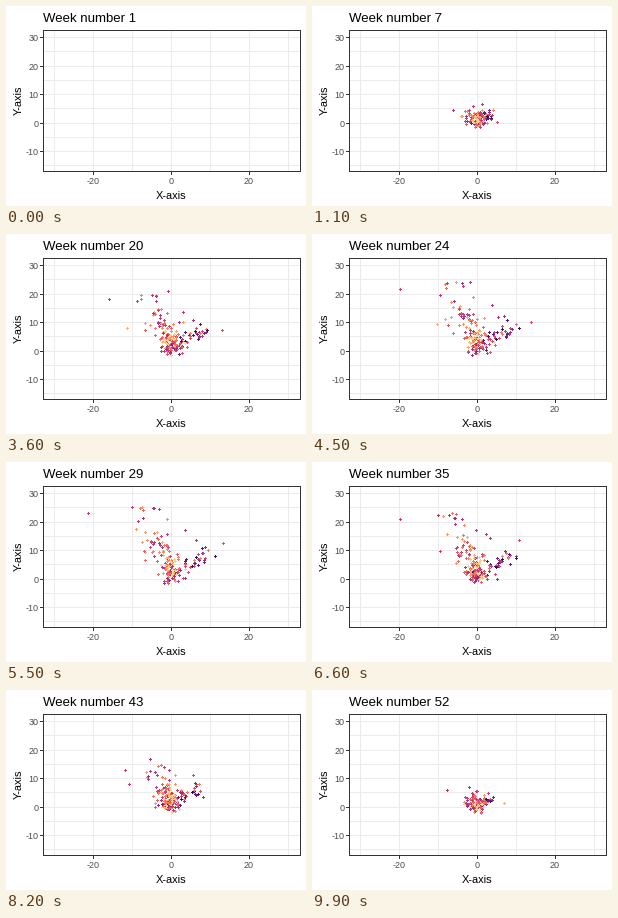
Write a matplotlib script that moves like this. It is 300 px wide and 200 px high and loops after 10000 ms.

```python
import numpy as np
import matplotlib.pyplot as plt
from matplotlib.animation import FuncAnimation

W, H, FRAMES, STEP, WEEKS = 300, 200, 100, 100, 52
PX = 0.72  # points per pixel at 100 dpi
LEFT, RIGHT, TOP, BOTTOM = 37, 294, 24, 165

plt.rcParams["font.family"] = "Liberation Sans"
fig = plt.figure(figsize=(W / 100, H / 100), dpi=100, facecolor="white")
ax = fig.add_axes([0, 0, 1, 1])
ax.set_xlim(0, W)
ax.set_ylim(H, 0)
ax.axis("off")


def sx(x):
    return 165 + 3.9 * x


def sy(y):
    return 117 - 2.845 * y


def line(x, y, color, z=1):
    # Whole coordinates snap to the centre of their pixel.
    ax.plot(x, y, color=color, lw=PX, antialiased=False, zorder=z,
            solid_capstyle="butt")


def label(x, y, s, size, color="black", **kw):
    return ax.text(x, y, s, fontsize=size * PX, color=color, **kw)


# Panel, grid and axes
GRID, DARK, GREY = "#ebebeb", "#333333", "#4d4d4d"
for v in range(-30, 31, 10):
    x = np.floor(sx(v))
    line([x, x], [TOP, BOTTOM], GRID)
    if abs(v) in (0, 20):
        line([x, x], [BOTTOM, BOTTOM + 3], DARK)
        label(x, 178.5, str(v), 9, GREY, ha="center")
for v in range(-15, 31, 5):
    y = np.floor(sy(v))
    line([LEFT, RIGHT], [y, y], GRID)
    if v % 10 == 0:
        line([LEFT - 3, LEFT], [y, y], DARK)
        label(32.5, y + 3.7, str(v), 9, GREY, ha="right")
line([LEFT, RIGHT, RIGHT, LEFT, LEFT], [TOP, TOP, BOTTOM, BOTTOM, TOP], DARK, 5)
label(165, 193, "X-axis", 11, ha="center")
label(12.5, 94.5, "Y-axis", 11, rotation=90, ha="center", va="center")
title = label(37, 16, "", 13.2)

# Swarm: a steep left arm, a flat right arm and a core around the origin
rng = np.random.default_rng(12)
N_LEFT, N_RIGHT, N_CORE = 75, 38, 75
N = N_LEFT + N_RIGHT + N_CORE

u_left = rng.beta(1.2, 1.7, N_LEFT)
u_right = rng.uniform(0, 1, N_RIGHT)
u_core = rng.uniform(0, 1, N_CORE)

sway_a, sway_b = rng.standard_t(4, (2, N, 2)) * 0.8
speed = rng.uniform(3, 9, (N, 1))
looseness = np.ones((N, 1))
looseness[:N_LEFT, 0] += 0.8 * u_left

tone = np.concatenate([
    rng.uniform(0.45, 0.88, N_LEFT),
    rng.uniform(0.15, 0.75, N_RIGHT),
    0.5 + 0.4 * u_core + rng.normal(0, 0.15, N_CORE),
])
tone = np.clip(tone, 0.03, 0.9)
tone[-1] = 0.99

dots = ax.scatter(np.zeros(N), np.zeros(N), s=(3 * PX) ** 2, marker="+",
                  c=plt.get_cmap("magma")(tone), linewidths=PX, zorder=3,
                  snap=False)


def pose(week):
    """Positions in a whole week: arms reach out by season, each dot sways."""
    t = week / (WEEKS - 1)
    season = max(np.sin(np.pi * t ** 1.15), 0) ** 1.3 + 0.15 * t
    reach = season ** 0.6
    x = np.concatenate([-season * (3 * u_left + 7 * u_left ** 2),
                        reach * 9.5 * u_right, 0 * u_core])
    y = np.concatenate([season * 27 * u_left,
                        reach * 9 * u_right ** 0.7, season * 5 * u_core])
    sway = sway_a * np.cos(speed * t) + sway_b * np.sin(speed * t)
    spread = min(1, 8 * t) * (0.9 + 0.5 * season)
    p = np.column_stack([x, y]) + sway * spread * looseness
    return np.clip(p, [-23, -8], [14, 30])


def draw(i):
    week = (WEEKS - 1) * i / (FRAMES - 1)
    k = int(week)
    f = week - k
    p = pose(k) * (1 - f) + pose(min(k + 1, WEEKS - 1)) * f
    dots.set_offsets(np.floor(np.column_stack([sx(p[:, 0]), sy(p[:, 1])])) + 0.5)
    title.set_text(f"Week number {round(1 + week)}")
    return dots, title


anim = FuncAnimation(fig, draw, frames=FRAMES, interval=STEP, repeat=True,
                     repeat_delay=0)
plt.show()
```
